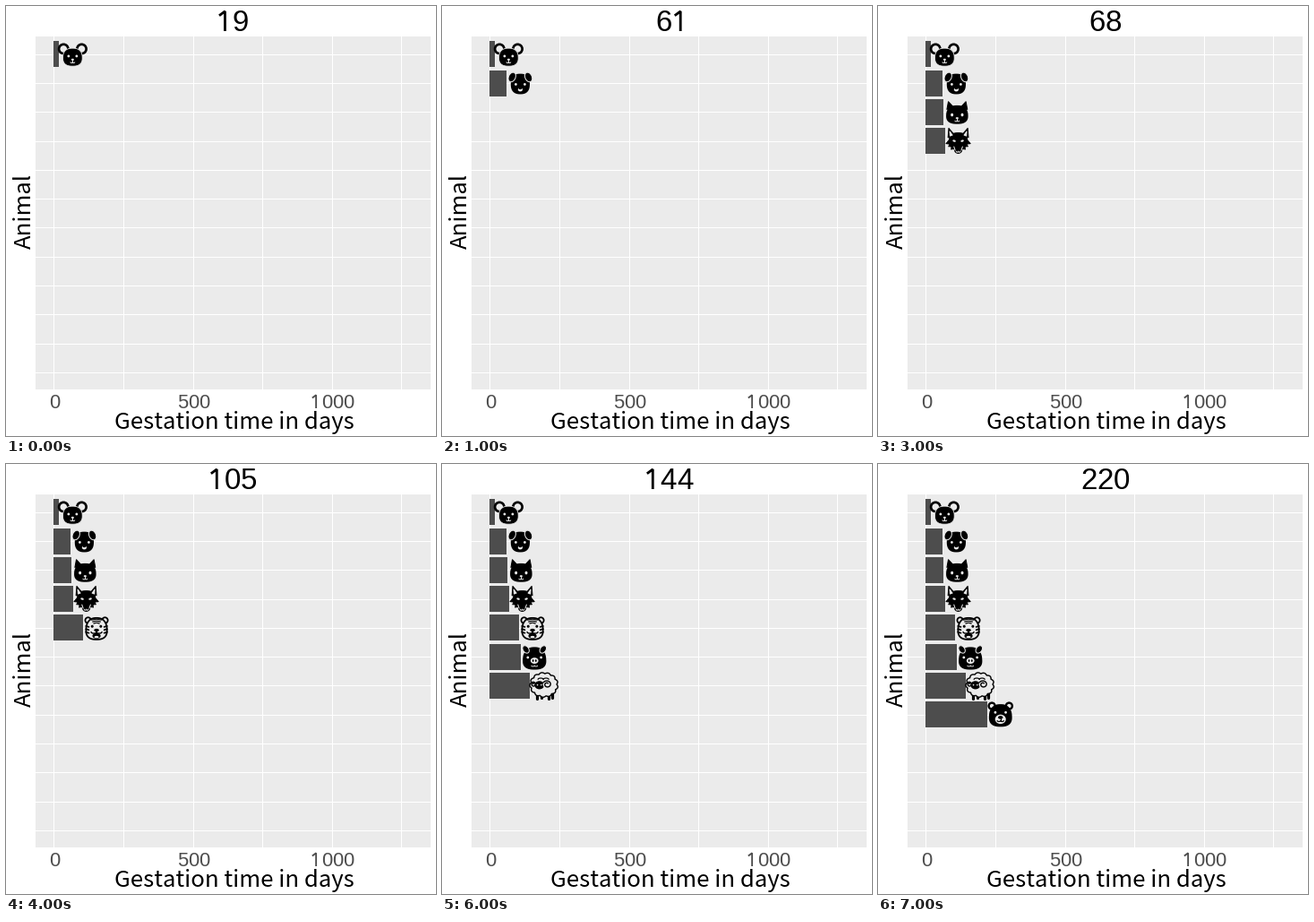
A matplotlib script for the animation above (8 s loop, 480 px wide and 480 px high).

```python
import numpy as np
import matplotlib.pyplot as plt
from matplotlib.animation import FuncAnimation
from matplotlib.patches import Ellipse, Polygon, Rectangle

SIZE, DPI = 480, 80
PT = 72 / DPI  # points per pixel
PANEL, GREY = "#ebebeb", "#4d4d4d"
LEFT, TOP, RIGHT, BOTTOM = 33, 34, 474, 428
ZERO, PER_DAY = 53.45, 0.3104
ROW_TOP, ROW_STEP, BAR_H = 53.75, 32.28, 29
MIDDLE = (LEFT + RIGHT) / 2
LOOP = np.linspace(0, 2 * np.pi, 200)

fig = plt.figure(figsize=(SIZE / DPI, SIZE / DPI), dpi=DPI, facecolor="white")
ax = fig.add_axes([0, 0, 1, 1])


def soft(wave, power=0.8):
    """Flattens a sine so that an ellipse becomes a rounded box."""
    return np.sign(wave) * np.abs(wave) ** power


class Pen:
    """Draws shapes in pixels around a centre, y pointing down."""

    def __init__(self, x, y):
        self.origin = np.array([x, y])

    def oval(self, x, y, rx, ry=None, fill="black", edge="none", lw=0, angle=0):
        ax.add_patch(Ellipse(self.origin + (x, y), 2 * rx, 2 * (ry or rx),
                             angle=angle, fc=fill, ec=edge, lw=lw * PT, zorder=4))

    def pair(self, x, y, rx, ry=None, angle=0, **style):
        self.oval(-x, y, rx, ry, angle=-angle, **style)
        self.oval(x, y, rx, ry, angle=angle, **style)

    def poly(self, pts, fill="black", edge="none", lw=0):
        ax.add_patch(Polygon(self.origin + pts, fc=fill, ec=edge, lw=lw * PT,
                             joinstyle="round", zorder=4))

    def head(self, w, h, y=0, taper=0, **style):
        """Rounded box, wider below by the taper."""
        c, s = np.cos(LOOP), np.sin(LOOP)
        self.poly(np.c_[w * (1 + taper * s) * soft(c), y + h * soft(s)], **style)

    def spikes(self, x, y, half, dx, dy, fill="black"):
        """Mirrored triangles whose tips lie (dx, dy) from their base."""
        across = half * np.array([-dy, dx]) / np.hypot(dx, dy)
        tri = np.array([(x, y) + across, (x, y) - across, (x + dx, y + dy)])
        for side in (1, -1):
            self.poly(tri * (side, 1), fill, fill, 1)

    def line(self, pts, color="black", lw=1.2):
        x, y = (self.origin + pts).T
        ax.plot(x, y, color=color, lw=lw * PT, solid_capstyle="round", zorder=4)

    def lines(self, pts, color="black", lw=1.2):
        for side in (1, -1):
            self.line(np.array(pts) * (side, 1), color, lw)

    def smile(self, y, w, drop, **style):
        """Two small arcs that meet under the nose."""
        t = np.linspace(0, np.pi, 15)
        self.lines(np.c_[w * (1 - np.cos(t)) / 2, y + drop * np.sin(t)], **style)

    def muzzle(self, y):
        self.oval(0, y, 1.6, 1, fill=PANEL)
        self.line([(0, y), (0, y + 3)], PANEL, 1)
        self.smile(y + 3, 2.4, 0.8, color=PANEL, lw=0.9)

    def curl(self, x, y, r, lw=1.4):
        s = np.linspace(0, 1, 40)
        radius, turn = r * (1 - 0.65 * s), 8 * s - 2.6
        self.line(np.c_[x + radius * np.cos(turn),
                        y + 0.9 * radius * np.sin(turn)], lw=lw)


def mouse(pen):
    pen.pair(10.1, -5.8, 6.5)
    pen.pair(10.1, -5.8, 3.8, fill=PANEL)
    pen.head(10.8, 10, 3.4, 0.05, edge=PANEL, lw=0.8)
    pen.pair(4.5, 2.2, 1.4, fill=PANEL)
    pen.muzzle(6)


def dog(pen):
    pen.head(10.6, 11.4, 1)
    pen.pair(9.2, -6.6, 3.8, 5.6, angle=-25, edge=PANEL, lw=1)
    pen.pair(5, 1.4, 1.4, fill=PANEL)
    pen.oval(0, 7.2, 2.6, 2.2, fill=PANEL)
    pen.oval(0, 5.8, 2, 1.3)


def cat(pen):
    pen.head(12.2, 10.4, 3, 0.08)
    pen.spikes(7.6, -4, 4, 2.2, -7.6)
    pen.pair(5.7, 3.2, 1.5, 1.8, fill=PANEL)
    pen.muzzle(6.8)


def wolf(pen):
    pen.head(10.6, 9.5, 0)
    pen.spikes(7.6, -5, 4, 3, -9.2)
    pen.spikes(7.8, -6, 1.4, 1.7, -4.6, PANEL)
    for k in range(3):
        pen.spikes(8.4 - 2 * k, 1 + 2.6 * k, 3, 5.2 - 0.8 * k, 2 + 0.6 * k)
    pen.oval(0, 9.4, 4.8, 5)
    pen.pair(4.5, 0, 1.8, 1.1, angle=-20, fill=PANEL)
    pen.lines([(4.8, 6.4), (3.4, 10.6)], PANEL, 1)
    pen.smile(11.6, 2.2, 1, color=PANEL, lw=1)


def tiger(pen):
    pen.pair(9.4, -8.4, 3.2, fill=PANEL, edge="black", lw=1.8)
    pen.head(11.6, 12, 1, 0.1, fill=PANEL, edge="black", lw=1.8)
    for k in range(3):
        pen.lines([(0.4, -9.6 + 2 * k), (5.6 - 1.2 * k, -8.8 + 2 * k)], lw=1.2)
        pen.lines([(11.8, 3.4 * k - 2), (8.6, 3.4 * k - 1)], lw=1.8)
    pen.pair(4.8, -1.6, 1.5)
    pen.oval(0, 2.6, 2.8, 1.6)
    pen.smile(4.6, 6, 1.6, lw=1.4)
    pen.oval(0, 9, 4.6, 3)
    pen.oval(0, 10.2, 2.4, 1.2, fill=PANEL)


def pig(pen):
    pen.head(13, 12.6, 1.8, 0.14)
    pen.pair(9.6, -8.2, 3.2, 4.6, angle=35, edge=PANEL, lw=1)
    pen.pair(7.4, 0.8, 1.4, fill=PANEL)
    pen.oval(0, 4.4, 4.4, 3.4, fill=PANEL)
    pen.pair(1.6, 4.4, 0.9, 1.4)
    pen.smile(10, 3.4, 0.8, color=PANEL, lw=0.9)


def sheep(pen):
    for k, x in enumerate((-7, -2.4, 6, 10)):
        pen.line([(x, 9), (x, 14.8 - k % 2)], lw=3.2)
    r = 0.9 + 0.1 * np.abs(np.sin(6.5 * LOOP + 0.3))
    pen.poly(np.c_[0.6 + 15.8 * r * np.cos(LOOP), -0.9 + 13.8 * r * np.sin(LOOP)],
             PANEL, "black", 1.4)
    pen.oval(-4.4, -0.6, 5.4, 4.6)
    for x in (-6.6, -2.4):
        pen.oval(x, -0.8, 0.8, fill=PANEL)
    pen.oval(4.2, -1.4, 4.8, 4.2, fill=PANEL)
    pen.curl(4.2, -1.4, 4.8)
    pen.curl(-11.2, -1.4, 3.2)
    pen.smile(-7, 6, -1.4)


def bear(pen):
    pen.pair(9.6, -9.6, 4.7)
    pen.pair(9.6, -9.6, 2.3, fill=PANEL)
    pen.head(12.8, 12.6, 1, 0.1)
    pen.pair(5.8, -2.4, 1.4, fill=PANEL)
    pen.oval(0, 5.2, 6, 5.2, fill=PANEL)
    pen.oval(0, 3.2, 2.7, 1.8)
    pen.line([(0, 4), (0, 6.8)])
    pen.smile(6.8, 3.6, 1)


ANIMALS = [(19, mouse), (61, dog), (64, cat), (68, wolf),
           (105, tiger), (112, pig), (144, sheep), (220, bear)]


def label(x, y, text, px, color="black", font="Noto Sans CJK JP", **kw):
    kw = {"ha": "center", "va": "baseline", **kw}
    ax.text(x, y, text, fontsize=px * PT, family=font, color=color, zorder=5, **kw)


def number(x, base, value, px, color):
    """Tabular digits with a footless one, centred by their ink."""
    text, pitch = str(value), 0.572 * px
    lead = 0.089 if text[0] == "1" else 0.045
    tail = 0.217 if text[-1] == "1" else 0.045
    left = x - pitch * len(text) / 2 + (tail - lead) / 2 * px
    for k, digit in enumerate(text):
        cell = left + k * pitch
        if digit == "1":
            stroke = np.array([(.11, -.54), (.311, -.69), (.311, 0)]) * px
            ax.plot(cell + stroke[:, 0], base + stroke[:, 1], color=color,
                    lw=0.088 * px * PT, solid_capstyle="butt",
                    solid_joinstyle="bevel", zorder=5)
        else:
            label(cell + pitch / 2, base, digit, 1.035 * px, color, "Liberation Sans")


def box(x0, y0, x1, y1, color, z):
    ax.add_patch(Rectangle((x0, y0), x1 - x0, y1 - y0, fc=color, ec="none", zorder=z))


def day_x(days):
    return ZERO + days * PER_DAY


def row_y(i):
    return ROW_TOP + i * ROW_STEP


def draw_grid():
    box(LEFT, TOP, RIGHT, BOTTOM, PANEL, 0)
    for days in range(0, 1251, 250):
        x = round(day_x(days))
        box(x, TOP, x + 1, BOTTOM, "white", 1)
    for i in range(12):
        y = round(row_y(i))
        box(LEFT, y, RIGHT, y + 1, "white", 1)


def draw(step):
    ax.clear()
    ax.set(xlim=(0, SIZE), ylim=(SIZE, 0))
    ax.axis("off")
    draw_grid()
    for i, (days, animal) in enumerate(ANIMALS[:step + 1]):
        top = round(row_y(i) - BAR_H / 2)
        box(round(ZERO), top, day_x(days), top + BAR_H, GREY, 3)
        animal(Pen(day_x(days) + 15, row_y(i)))
    number(MIDDLE, 28, ANIMALS[step][0], 32, "black")
    for days in (0, 500, 1000):
        number(day_x(days) + 0.5, 449, days, 21.3, GREY)
    label(MIDDLE + 1.2, 472, "Gestation time in days", 25.75)
    label(28.3, 270.8, "Animal", 25.75, rotation=90, rotation_mode="anchor", ha="left")
    return []


anim = FuncAnimation(fig, draw, frames=len(ANIMALS), init_func=lambda: draw(0),
                     interval=1000, repeat=True, repeat_delay=0, blit=False)
plt.show()
```
